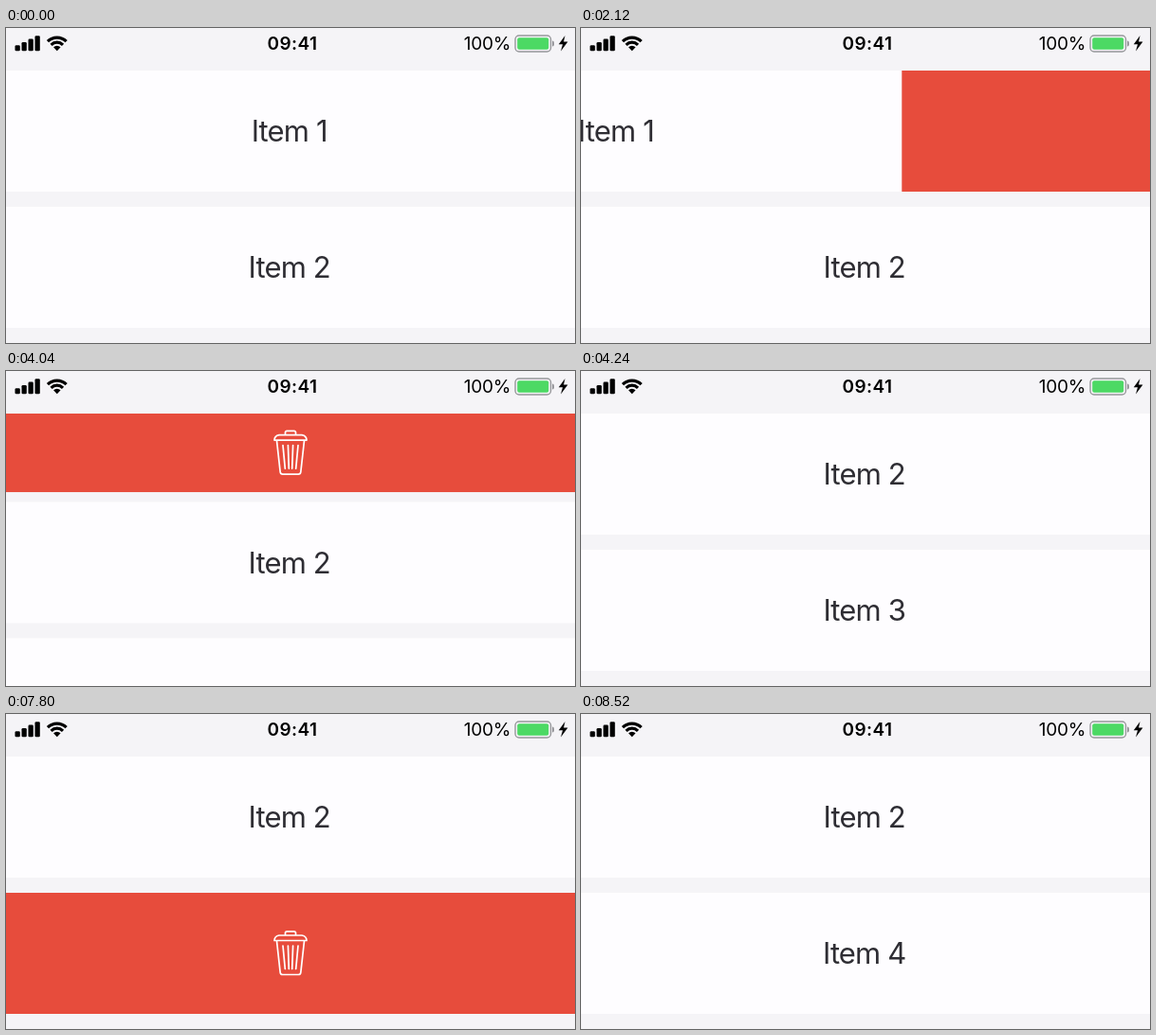
An HTML page with a canvas for the animation above (9 s loop, 600 by 333 pixels).

```html
<!DOCTYPE html>
<html lang="en">
<head>
<meta charset="utf-8">
<title>Swipe to delete</title>
<style>
html, body { margin: 0; width: 100%; height: 100%; overflow: hidden; background: #f5f4f7; }
canvas { display: block; }
</style>
</head>
<body>
<canvas width="600" height="333"></canvas>
<script>
const ctx = document.querySelector('canvas').getContext('2d');
const LOOP = 9000, TOP = 45, ROW = 128, GAP = 16, COLLAPSE = 300;
const FONT = 'Inter, "Liberation Sans", sans-serif';

// Times in ms: swipe curve start, first visible move, swipe length, collapse start
const items = [
  { label: 'Item 1', start: 1804, shown: 1840, length: 760, collapse: 3920 },
  { label: 'Item 2' },
  { label: 'Item 3', start: 6583, shown: 6680, length: 930, collapse: 7960 },
  { label: 'Item 4' }
];

const clamp = v => Math.max(0, Math.min(1, v));
const easeInOut = v => (1 - Math.cos(Math.PI * clamp(v))) / 2;
const easeSwipe = v => 1 - (1 - clamp(v) ** 2) ** 3;

function rect(x, y, w, h, color) {
  ctx.fillStyle = color;
  ctx.fillRect(x, y, w, h);
}

function rounded(x, y, w, h, r) {
  ctx.beginPath();
  ctx.roundRect(x, y, w, h, r);
}

function text(str, x, y, font, color, spacing = 0) {
  ctx.font = `${font} ${FONT}`;
  ctx.letterSpacing = spacing + 'px';
  ctx.textAlign = 'center';
  ctx.fillStyle = color;
  ctx.fillText(str, x, y);
}

const trash = new Path2D(`
  M294.5 90V87.5Q294.5 85.8 296.2 85.8H303.8Q305.5 85.8 305.5 87.5V90
  M288 90H312Q317 91 317 95.5H283Q283 91 288 90Z
  M285.5 96L289.2 129.3Q289.5 131.5 291.7 131.5H308.3Q310.5 131.5 310.8 129.3L314.5 96
  M292 101L294.3 125.5M297.4 101L298.3 125.5M302.6 101L301.7 125.5M308 101L305.7 125.5`);
const bolt = new Path2D('M589.5 8L582.8 17.3H587L585 24.5L592.4 14.6H588Z');

function drawStatusBar() {
  ctx.fillStyle = '#000';
  for (let i = 0; i < 4; i++) {
    const h = 6 + i * 3.3;
    rounded(9.5 + i * 7, 24.2 - h, 5.3, h, 1.3);
    ctx.fill();
  }

  const from = -Math.PI * 0.75, to = -Math.PI * 0.25;
  ctx.strokeStyle = '#000';
  ctx.lineWidth = 3.2;
  ctx.lineCap = 'butt';
  for (const r of [8.8, 13.9]) {
    ctx.beginPath();
    ctx.arc(53.8, 24, r, from, to);
    ctx.stroke();
  }
  ctx.beginPath();
  ctx.moveTo(53.8, 24.3);
  ctx.arc(53.8, 24, 5.3, from, to);
  ctx.fill();

  text('09:41', 302, 23.3, '600 19px', '#000', 0.4);
  text('100%', 507.5, 23.3, '400 19px', '#000', -0.25);

  ctx.strokeStyle = '#98989c';
  ctx.lineWidth = 1.4;
  rounded(537, 8, 37.5, 17, 4);
  ctx.stroke();
  ctx.fillStyle = '#4cd964';
  rounded(539.2, 10.2, 33, 12.6, 2);
  ctx.fill();
  ctx.fillStyle = '#98989c';
  rounded(576, 13.5, 2, 6, [0, 2, 2, 0]);
  ctx.fill();
  ctx.fillStyle = '#000';
  ctx.fill(bolt);
}

function drawDeletePanel(y, height, x) {
  ctx.save();
  ctx.beginPath();
  ctx.rect(x, y, 600 - x, height);
  ctx.clip();
  rect(0, y, 600, height, '#e74c3c');
  ctx.translate(0, y + height / 2 - TOP - ROW / 2);
  ctx.strokeStyle = '#fff';
  ctx.lineWidth = 1.7;
  ctx.lineCap = ctx.lineJoin = 'round';
  ctx.stroke(trash);
  ctx.restore();
}

function draw(t) {
  rect(0, 0, 600, 333, '#f5f4f7');
  let y = TOP;
  for (const { label, start, shown, length, collapse } of items) {
    const swipe = t >= shown ? 600 * easeSwipe((t - start) / length) : 0;
    const scale = collapse ? 1 - easeInOut((t - collapse) / COLLAPSE) : 1;
    if (swipe) drawDeletePanel(y, ROW * scale, 600 - swipe);
    if (swipe < 600) {
      rect(-swipe, y, 600, ROW, '#fefdff');
      text(label, 298.7 - swipe, y + 75, '400 31px', '#2e2d33', -0.85);
    }
    y += (ROW + GAP) * scale;
  }
  drawStatusBar();
}

function tick() {
  draw(performance.now() % LOOP);
  requestAnimationFrame(tick);
}
tick();
</script>
</body>
</html>
```
